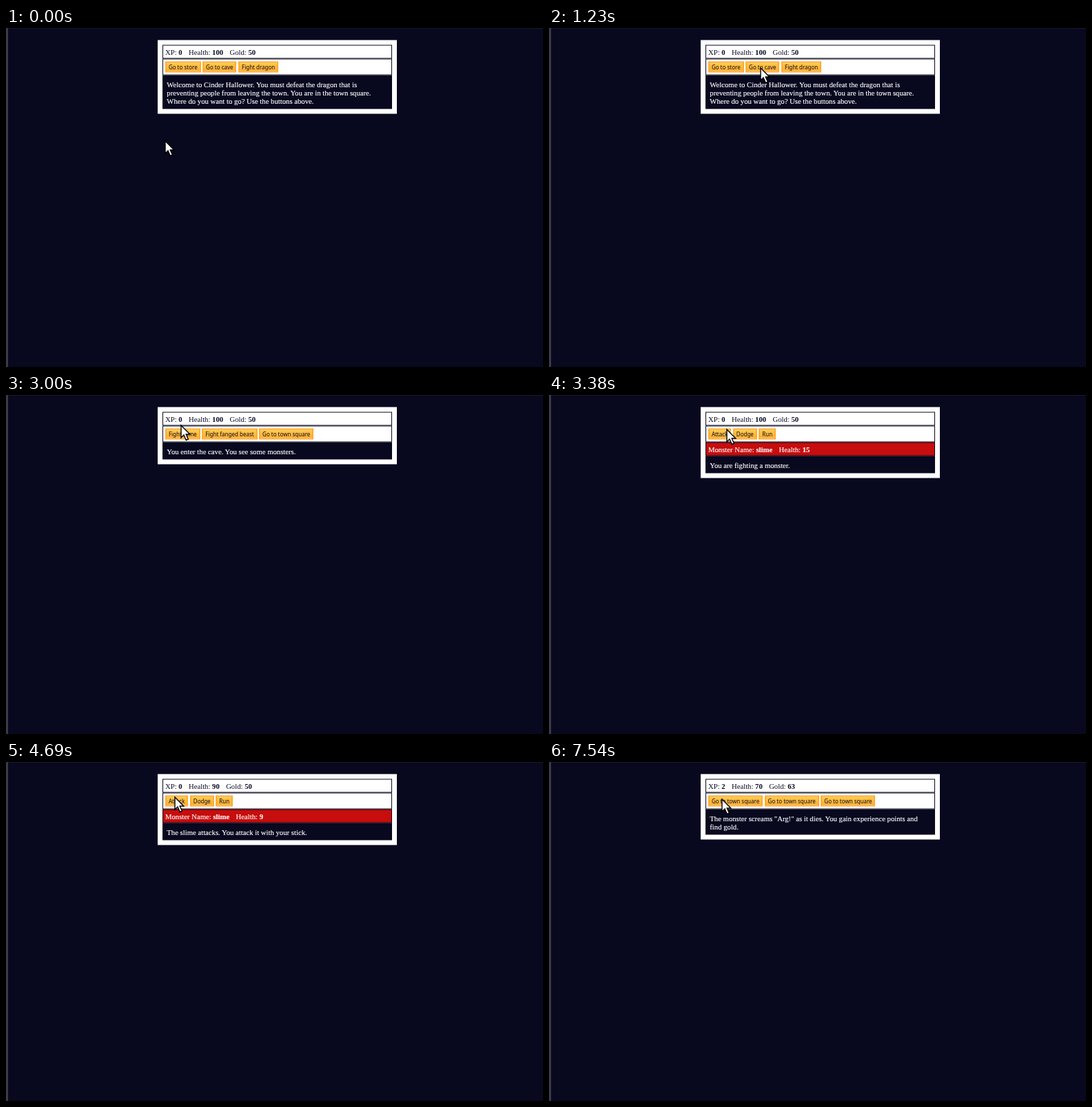
Write an HTML page that moves like this. It is 779 by 492 pixels and loops after 8000 ms.

```html
<!DOCTYPE html>
<html lang="en">
<head>
<meta charset="utf-8">
<title>Town square</title>
<style>
  * { box-sizing: border-box; }
  html, body { margin: 0; width: 100%; height: 100%; overflow: hidden; background: #08081f; }
  body { position: relative; font: 10.69px/12px "Liberation Serif", "Times New Roman", serif; white-space: nowrap; }
  #edge { position: absolute; left: 0; top: 0; width: 3px; height: 100%; background: #3a3a48; }
  #top { position: absolute; left: 3px; top: 0; right: 0; height: 1px; background: #1a1a2d; }
  #game { position: absolute; left: 0; top: 0; width: 346.67px; padding: 6.67px; background: #fff; color: #fff;
    transform: translate(220px, 17.5px); }
  .row { border: 1px solid #08081f; padding: 3px 3.33px; height: 20px; }
  #stats { color: #0a0a23; }
  #controls { height: 24px; padding-top: 3.33px; display: flex; gap: 2.67px; }
  #foe { background: #c70d0d; }
  #text { background: #08081f; padding: 7px 6.67px 6.33px; }
  #foe, #text { -webkit-text-stroke: 0.15px #fff; }
  .stat { padding-right: 6.67px; }
  .btn { height: 15.7px; border: 2px solid #feac32; padding: 0 2.9px; color: #0a0a23;
    background: linear-gradient(#fecc4c, #ffac33); font: 8px/12px "Noto Sans", sans-serif; }
  #cursor { position: absolute; left: -0.5px; top: -0.5px; width: 20px; height: 30px; overflow: visible; }
</style>
</head>
<body>
<div id="edge"></div>
<div id="top"></div>
<div id="game">
  <div id="stats" class="row"></div>
  <div id="controls" class="row"></div>
  <div id="foe" class="row"></div>
  <div id="text"></div>
</div>
<svg id="cursor"><path d="M0 0V18L4 14L7.3 21.5L10.4 20.2L7.2 13H12.8Z" fill="#fff" stroke="#000" stroke-width="1.4"/></svg>
<script>
const LOOP = 8000, TICK = 1000 / 13;
const $ = id => document.getElementById(id);

const fight = ["Attack", "Dodge", "Run"];
const clash = "The slime attacks. You attack it with your stick.";
const home = "Go to town square";

// at: tick of the change; foe: monster health
const scenes = [
  { at: 0, buttons: ["Go to store", "Go to cave", "Fight dragon"],
    text: "Welcome to Cinder Hallower. You must defeat the dragon that is<br>" +
      "preventing people from leaving the town. You are in the town square.<br>" +
      "Where do you want to go? Use the buttons above." },
  { at: 31, buttons: ["Fight slime", "Fight fanged beast", home],
    text: "You enter the cave. You see some monsters." },
  { at: 44, buttons: fight, foe: 15, text: "You are fighting a monster." },
  { at: 61, buttons: fight, foe: 9, health: 90, text: clash },
  { at: 86, buttons: fight, foe: 3, health: 80, text: clash },
  { at: 98, buttons: [home, home, home], xp: 2, health: 70, gold: 63,
    text: 'The monster screams "Arg!" as it dies. You gain experience points and<br>find gold.' }
];

// Pointer moves: each is a smooth curve through a few points, resting at its end
const moves = [
  { from: 0, to: 3, via: [[231, 164], [229, 162]] },
  { from: 5, to: 16, via: [[229, 162], [205, 120], [275, 63], [322, 59], [307, 58]] },
  { from: 16, to: 18, via: [[307, 58], [325, 71], [341, 60]] },
  { from: 19, to: 23, via: [[341, 60], [324, 52]] },
  { from: 35, to: 39, via: [[324, 52], [254, 44]] },
  { from: 39, to: 44, via: [[254, 44], [258, 50]] },
  { from: 47, to: 58, via: [[258, 50], [187, 61], [287, 58], [268, 57]] },
  { from: 58, to: 59, via: [[268, 57], [245, 51]] },
  { from: 74, to: 76, via: [[245, 51], [268, 57], [251, 54]] }
];

const last = (list, test) => list.filter(test).pop();
const stat = (name, value) => `<span class="stat">${name}: <b>${value}</b></span>`;

// Catmull-Rom curve through pts, u from 0 to 1
function along(pts, u) {
  const end = pts.length - 1;
  const i = Math.min(Math.floor(u * end), end - 1);
  const f = u * end - i;
  const [a, b, c, d] = [i - 1, i, i + 1, i + 2].map(k => pts[Math.max(0, Math.min(end, k))]);
  return [0, 1].map(k => b[k] + f / 2 * (c[k] - a[k] +
    f * (2 * a[k] - 5 * b[k] + 4 * c[k] - d[k] + f * (3 * (b[k] - c[k]) + d[k] - a[k]))));
}

let shown;
function show(scene) {
  if (scene === shown) return;
  shown = scene;
  const { xp = 0, health = 100, gold = 50, buttons, foe, text } = scene;
  $("stats").innerHTML = [stat("XP", xp), stat("Health", health), stat("Gold", gold)].join(" ");
  $("controls").innerHTML = buttons.map(b => `<div class="btn">${b}</div>`).join("");
  $("foe").style.display = foe ? "block" : "none";
  $("foe").innerHTML = stat("Monster Name", "slime") + " " + stat("Health", foe);
  $("text").innerHTML = text;
}

function draw() {
  // The picture advances 13 times a second
  const tick = Math.floor((performance.now() % LOOP) / TICK + 0.1);
  show(last(scenes, s => s.at <= tick));
  const { from, to, via } = last(moves, m => m.from <= tick);
  const [x, y] = along(via, Math.min(1, (tick - from) / (to - from))).map(Math.round);
  $("cursor").style.transform = `translate(${x}px, ${y}px)`;
  requestAnimationFrame(draw);
}
draw();
</script>
</body>
</html>
```
